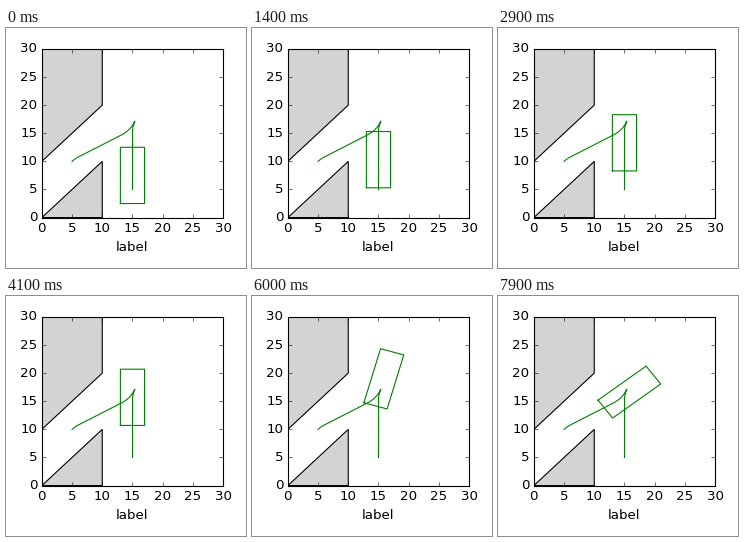
Animation of 240x240 px, one loop 8000 ms. Source, as a matplotlib script:

```python
import numpy as np
import matplotlib.pyplot as plt
from matplotlib.animation import FuncAnimation

plt.style.use("classic")
plt.rcParams["font.family"] = "DejaVu Sans"

SIZE, DPI = 240, 80
FRAMES, INTERVAL = 80, 100
# plot area in pixels from the top left corner
LEFT, RIGHT, TOP, BOTTOM = 35.84, 217.1, 20.9, 189.6
STEP = 0.2
START = (15.0, 5.0, np.pi / 2)
# (signed length, curvature); negative lengths are driven in reverse
SEGMENTS = [(10.2, 0), (2.0, -0.2), (-3.35, 0.2), (-8.04, 0), (-1.423, -0.2)]
REAR, FRONT, HALF_WIDTH = -2.5, 7.5, 2.0


def advance(pose, d, curvature):
    x, y, h = pose
    if curvature == 0:
        return x + d * np.cos(h), y + d * np.sin(h), h
    turned = h + curvature * d
    return (x + (np.sin(turned) - np.sin(h)) / curvature,
            y - (np.cos(turned) - np.cos(h)) / curvature,
            turned)


def pose_at(travel):
    """Pose of the rear axle after driving the given distance."""
    pose = START
    for length, curvature in SEGMENTS:
        part = min(travel, abs(length))
        pose = advance(pose, np.copysign(part, length), curvature)
        travel -= part
        if travel <= 0:
            break
    return pose


def travel_at(frame):
    """Distance driven, with short stops between the first manoeuvres."""
    straight = min(frame, 51)
    arc = np.clip(frame - 53, 0, 10)
    reverse = max(frame - 66, 0)
    return STEP * (straight + arc + reverse)


def car_outline(pose):
    x, y, h = pose
    along = np.array([REAR, FRONT, FRONT, REAR, REAR])
    side = HALF_WIDTH * np.array([1, 1, -1, -1, 1])
    return (x + along * np.cos(h) - side * np.sin(h),
            y + along * np.sin(h) + side * np.cos(h))


def planned_path():
    ends = np.cumsum([0] + [abs(length) for length, _ in SEGMENTS])
    stops = np.concatenate([np.append(np.arange(a, b, STEP), b)
                            for a, b in zip(ends, ends[1:])])
    return np.array([pose_at(s)[:2] for s in stops]).T


fig = plt.figure(figsize=(SIZE / DPI, SIZE / DPI), dpi=DPI, facecolor="white")
ax = fig.add_axes([LEFT / SIZE, 1 - BOTTOM / SIZE,
                   (RIGHT - LEFT) / SIZE, (BOTTOM - TOP) / SIZE])
ax.set(xlim=(0, 30), ylim=(0, 30), xlabel="label",
       xticks=range(0, 31, 5), yticks=range(0, 31, 5))

for corners in ([(0, 10), (0, 30), (10, 30), (10, 20)],
                [(0, 0), (10, 10), (10, 0)]):
    ax.add_patch(plt.Polygon(corners, facecolor="lightgray",
                             edgecolor="black", snap=False))

ax.plot(*planned_path(), color="green")
car, = ax.plot([], [], color="green", snap=False)


def update(frame):
    car.set_data(*car_outline(pose_at(travel_at(frame))))
    return car,


anim = FuncAnimation(fig, update, frames=FRAMES, interval=INTERVAL,
                     repeat=True, repeat_delay=0)
plt.show()
```
